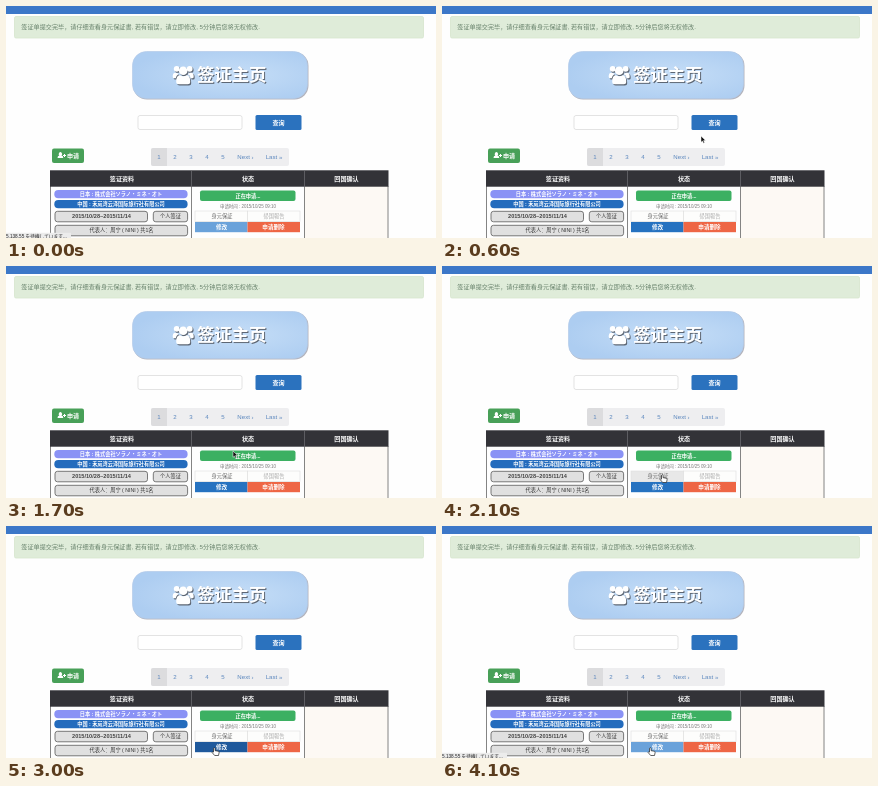
These frames come from a looping animation (430x232 px, 4200 ms). An HTML page:

```html
<!DOCTYPE html>
<html lang="zh-CN">
<head>
<meta charset="utf-8">
<title>签证主页</title>
<style>
html, body { margin: 0; width: 100%; height: 100%; overflow: hidden; background: #fefefe; }
svg { display: block; width: 430px; height: 232px; }
text { font-family: "Liberation Sans", "Noto Sans CJK SC", sans-serif; font-size: 6.1px;
  text-anchor: middle; dominant-baseline: central; white-space: pre; }
.b { font-weight: bold; }
.w { fill: #fff; }
.left { text-anchor: start; }
.page text { fill: #5a86bd; }
.s { font-size: 5.2px; }
.btn { font-size: 5.6px; }
.pill { fill: #e0e0e0; stroke: #6a6a6a; stroke-width: .9; }
.cell { fill: #fdfdfc; stroke: #ddd; stroke-width: .6; }
</style>
</head>
<body>
<svg viewBox="0 0 430 232">
  <defs>
    <radialGradient id="sky" cx=".58" cy=".5" r=".6">
      <stop stop-color="#c6def7"/><stop offset="1" stop-color="#adcdf1"/>
    </radialGradient>
    <g id="people">
      <circle cx="4" cy="5" r="2.9"/><circle cx="17" cy="5" r="2.9"/><circle cx="10.5" cy="7" r="4.3"/>
      <path d="M0 13Q0 8.5 3 9L6 10Q3.500 12 3 14.500H1.500Q0 14.500 0 13ZM21 13Q21 8.500 18 9L15 10Q17.500 12 18 14.500H19.500Q21 14.500 21 13Z"/>
      <path d="M3.500 18Q3.500 11.500 7 11.500Q10.500 13.500 14 11.500Q17.500 11.500 17.500 18Q17.500 20.500 15 20.500H6Q3.500 20.500 3.500 18Z"/>
    </g>
    <g id="title">
      <use href="#people" x="166.700" y="57.800"/>
      <text class="b" x="225.700" y="69" style="font-size:17.4px">签证主页</text>
    </g>
  </defs>

  <rect width="430" height="232" fill="#fefefe"/>
  <rect width="430" height="8" fill="#3c77c8"/>
  <rect x="8.500" y="10.500" width="409" height="21.500" rx="1.500" fill="#dfecd9" stroke="#d6e5cd" stroke-width=".8"/>
  <text class="left" x="15.300" y="20.700" style="font-size:6.130px" fill="#66806a">签证单提交完毕，请仔细查看身元保証書, 若有错误，请立即修改, 5分钟后您将无权修改.</text>

  <rect x="127" y="46" width="175.500" height="47.500" rx="14" fill="#b3b3bb"/>
  <rect x="126.500" y="45.500" width="175" height="47" rx="14" fill="url(#sky)" stroke="#b4cbe8" stroke-width=".7"/>
  <use href="#title" x="1" y="1.100" fill="#5d6673"/>
  <use href="#title" fill="#fff"/>

  <rect x="132" y="109.500" width="104" height="14" rx="2" fill="#fff" stroke="#dcdcdc" stroke-width=".8"/>
  <rect x="249.500" y="109" width="46" height="15" rx="1.500" fill="#2b72be"/>
  <text class="b w" x="272.500" y="116.500">查询</text>

  <rect x="46" y="142.500" width="32" height="14.500" rx="2" fill="#48a058"/>
  <path class="w" d="M51.500 152Q51.500 149.700 53.300 149.500A1.700 1.900 0 1 1 55.500 149.500Q57.300 149.700 57.300 152ZM57 149H58V148H59V149H60V150H59V151H58V150H57Z"/>
  <text class="b w" x="67" y="149.700">申请</text>

  <g class="page">
    <rect x="145" y="142" width="138" height="18" rx="2" fill="#eeeef0"/>
    <path d="M147 142H161V160H147Q145 160 145 158V144Q145 142 147 142Z" fill="#dcdcde"/>
    <text x="153" y="150.700">1</text><text x="169" y="150.700">2</text><text x="185" y="150.700">3</text>
    <text x="201" y="150.700">4</text><text x="217" y="150.700">5</text>
    <text x="239.500" y="150.700">Next ›</text><text x="268" y="150.700">Last »</text>
  </g>

  <rect x="298" y="180" width="84" height="52" fill="#fdf9f4"/>
  <path d="M44.500 180V232M185.500 180V232M298.500 180V232M382 180V232" stroke="#777" stroke-width=".9"/>
  <rect x="44" y="164.300" width="338.500" height="16.400" fill="#333338"/>
  <path d="M185.500 164.300V181M298.500 164.300V181" stroke="#707074" stroke-width=".7"/>
  <text class="b w" x="116" y="172.500">签证资料</text>
  <text class="b w" x="242" y="172.500">状态</text>
  <text class="b w" x="340.500" y="172.500">回国确认</text>

  <rect x="48.300" y="184" width="133.300" height="8.300" rx="4" fill="#8a92f5"/>
  <text class="s b w" x="115" y="188">日本 : 株式会社ソラノ・ミネ・オト</text>
  <rect x="48.300" y="194" width="133.300" height="8.300" rx="4" fill="#236bbd"/>
  <text class="s b w" x="115" y="198">中国 : 禾岚湾云泽国际旅行社有限公司</text>
  <rect class="pill" x="49" y="205.300" width="92.500" height="10.500" rx="2.500"/>
  <text class="b btn" x="95.500" y="210.300" fill="#444">2015/10/28~2015/11/14</text>
  <rect class="pill" x="147.300" y="205.300" width="34.300" height="10.500" rx="2.500"/>
  <text class="s" x="164.500" y="210.300" fill="#333">个人签证</text>
  <rect class="pill" x="49" y="219.300" width="132.600" height="10.500" rx="2.500"/>
  <text class="s" x="115.500" y="224.300" fill="#333">代表人：周宁 ( NINI ) 共1名</text>

  <rect x="194" y="184.600" width="95.500" height="10.400" rx="2" fill="#3cb062"/>
  <text class="s b w" x="242" y="189.600">正在申请...</text>
  <text x="242" y="200" style="font-size:4.450px" fill="#777">申请时间 : 2015/10/25 09:10</text>
  <rect id="proof" class="cell" x="189" y="205" width="52.500" height="10.500"/>
  <rect class="cell" x="241.500" y="205" width="52.500" height="10.500"/>
  <text class="s" x="216" y="210.200" fill="#666">身元保証</text>
  <text class="s" x="268" y="210.200" fill="#aaa">帰国報告</text>
  <rect id="edit" x="189" y="216" width="52.500" height="10.200"/>
  <rect x="241.500" y="216" width="52.500" height="10.200" fill="#ee6645"/>
  <text class="b w btn" x="215.500" y="221">修改</text>
  <text class="b w btn" x="267.500" y="221">申请删除</text>

  <g id="status">
    <rect y="226.800" width="65" height="6" fill="#ececec"/>
    <text class="left" x="0" y="230" style="font-size:4.700px" fill="#222">5.138.55 を待機しています...</text>
  </g>

  <g id="cursor">
    <path id="arrow" d="M0 0V6.300L1.500 5 2.500 7.300 3.600 6.800 2.600 4.600H4.600Z" fill="#111" stroke="#fff" stroke-width=".5"/>
    <path id="hand" d="M0 .8Q.8-.4 1.600 .8V3.200L4.800 3.700Q5.800 4 5.600 5.200L5 8H1.200L-1.400 5Q-1.300 4 0 4.600Z" fill="#fff" stroke="#222" stroke-width=".7"/>
  </g>
</svg>
<script>
const LOOP = 4200, STEP = 100;
// time, x, y of the pointer tip
const path = [[100, 259, 130], [1300, 259, 130], [1700, 227, 185], [2100, 219.5, 208.5],
  [2500, 219.5, 208.5], [3000, 207.5, 221.5], [LOOP, 207.5, 221.5]];
const $ = id => document.getElementById(id);
const show = (id, opacity) => $(id).setAttribute('opacity', +opacity);

function pointerAt(t) {
  const i = Math.max(1, path.findIndex(p => p[0] > t));
  const [t0, x0, y0] = path[i - 1], [t1, x1, y1] = path[i];
  const u = Math.max(0, (t - t0) / (t1 - t0)), k = u * u * (3 - 2 * u);
  return [x0 + (x1 - x0) * k, y0 + (y1 - y0) * k];
}

function draw(now) {
  const t = Math.floor(now % LOOP / STEP) * STEP;
  const [x, y] = pointerAt(t);
  const loading = t < 100 || t >= 3400;
  const overProof = y > 205 && y < 215.5, overEdit = y >= 215.5;

  $('cursor').setAttribute('transform', `translate(${x} ${y})`);
  show('cursor', t >= 100);
  show('hand', y > 205);
  show('arrow', y <= 205);
  show('status', loading);
  $('proof').style.fill = overProof ? '#e8e8e8' : '';
  $('edit').setAttribute('fill', loading ? '#6aa2da' : overEdit ? '#1f599c' : '#2672c0');
  requestAnimationFrame(draw);
}
requestAnimationFrame(draw);
</script>
</body>
</html>
```
